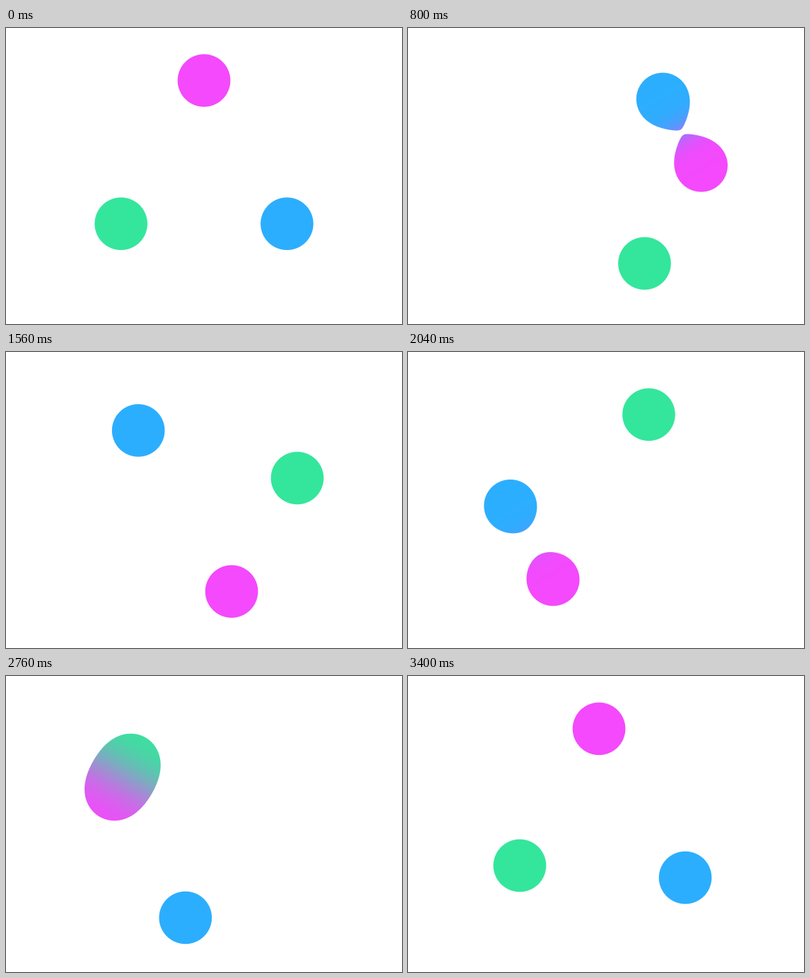
Recreate the animation shown at these times as an HTML page with a canvas. Size 560 px wide and 420 px high, loop 3440 ms.

```html
<!DOCTYPE html>
<html lang="en">
<head>
<meta charset="utf-8">
<title>Orbiting blobs</title>
<style>
  html, body { margin: 0; width: 100%; height: 100%; overflow: hidden; background: #fff; }
  canvas { display: block; }
</style>
</head>
<body>
<canvas id="stage" width="560" height="420"></canvas>
<script>
const W = 560, H = 420;
const LOOP = 3440, STEP = 40;
const CX = 280, CY = 210, ORBIT = 135.5;
const RADIUS = 37.3;
const SPREAD = 2237;                          // squared falloff of each blob
const LEVEL = Math.exp(-RADIUS * RADIUS / SPREAD);

const ctx = document.getElementById('stage').getContext('2d');
const image = ctx.createImageData(W, H);
const pixels = image.data;

// start angle in degrees, direction of travel, colour
const blobs = [
  { start: -90, dir: 1, rgb: [244, 73, 252] },
  { start: 30, dir: -1, rgb: [44, 174, 254] },
  { start: 150, dir: -1, rgb: [52, 230, 156] }
].map(b => ({ ...b, gx: new Float64Array(W), gy: new Float64Array(H) }));

function fillFalloff(table, center) {
  for (let i = 0; i < table.length; i++) {
    const d = i + 0.5 - center;
    table[i] = Math.exp(-d * d / SPREAD);
  }
}

function place(blob, turn) {
  const a = blob.start * Math.PI / 180 + blob.dir * turn;
  blob.x = CX + ORBIT * Math.cos(a);
  blob.y = CY + ORBIT * Math.sin(a);
  fillFalloff(blob.gx, blob.x);
  fillFalloff(blob.gy, blob.y);
}

function draw(t) {
  const turn = 2 * Math.PI * t / LOOP;
  blobs.forEach(b => place(b, turn));
  pixels.fill(255);

  for (let y = 0; y < H; y++) {
    for (let x = 0; x < W; x++) {
      let sum = 0, dx = 0, dy = 0, r = 0, g = 0, b = 0;
      for (const blob of blobs) {
        const f = blob.gx[x] * blob.gy[y];
        sum += f;
        dx += f * (x + 0.5 - blob.x);
        dy += f * (y + 0.5 - blob.y);
        r += f * blob.rgb[0];
        g += f * blob.rgb[1];
        b += f * blob.rgb[2];
      }
      if (sum < LEVEL * 0.9) continue;

      // distance to the contour gives the edge coverage
      const slope = 2 / SPREAD * Math.hypot(dx, dy) + 1e-9;
      const cover = Math.min(1, Math.max(0, 0.5 + (sum - LEVEL) / slope));
      const i = (y * W + x) * 4;
      pixels[i] = 255 + (r / sum - 255) * cover;
      pixels[i + 1] = 255 + (g / sum - 255) * cover;
      pixels[i + 2] = 255 + (b / sum - 255) * cover;
    }
  }
  ctx.putImageData(image, 0, 0);
}

let begin = null, shown = -1;

function tick(now) {
  if (begin === null) begin = now;
  const t = Math.floor((now - begin) % LOOP / STEP) * STEP;
  if (t !== shown) draw(shown = t);
  requestAnimationFrame(tick);
}

draw(0);
requestAnimationFrame(tick);
</script>
</body>
</html>
```
